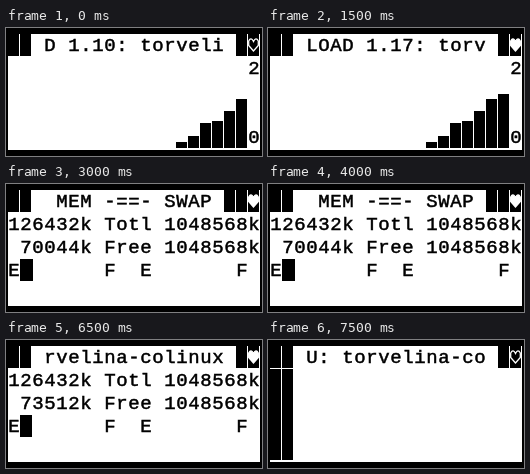
Animation, 256 px wide and 128 px high, one loop 8000 ms. Source, as an HTML page with a canvas:

```html
<!DOCTYPE html>
<html lang="en">
<head>
<meta charset="utf-8">
<title>Status display</title>
<style>
  html, body { margin: 0; width: 100%; height: 100%; overflow: hidden; background: #000; }
  canvas { display: block; width: 256px; height: 128px; }
</style>
</head>
<body>
<canvas id="lcd" width="256" height="128"></canvas>
<script>
const ctx = document.getElementById('lcd').getContext('2d');
const LEFT = 2, TOP = 6, CELL_W = 12, CELL_H = 23;
const TICK = 500, LOOP = 8000, TITLE_W = 15;
const HOST = 'torvelina-colinux';
const BEATS = [1, 3, 6, 8, 11, 13];
const LOADS = [0.13, 0.26, 0.54, 0.59, 0.80, 1.07];

const colX = col => LEFT + col * CELL_W;

function box(x, y, w, h, color = '#000') {
  ctx.fillStyle = color;
  ctx.fillRect(x, y, w, h);
}

// Each character is centred in its own cell.
function print(text, col, row) {
  ctx.fillStyle = ctx.strokeStyle = '#000';
  ctx.lineWidth = 0.5;
  [...text].forEach((ch, i) => {
    const x = colX(col + i) + CELL_W / 2, y = 23 + row * CELL_H;
    ctx.fillText(ch, x, y);
    ctx.strokeText(ch, x, y);
  });
}

const block = col => box(colX(col), TOP, CELL_W - 1, CELL_H - 1);

function heart(filled) {
  ctx.beginPath();
  ctx.moveTo(247.5, 23);
  ctx.lineTo(242.7, 17.5);
  ctx.lineTo(242.7, 13);
  ctx.quadraticCurveTo(245, 8.5, 247.5, 13.5);
  ctx.quadraticCurveTo(250, 8.5, 252.3, 13);
  ctx.lineTo(252.3, 17.5);
  ctx.closePath();
  ctx.strokeStyle = ctx.fillStyle = '#fff';
  ctx.lineWidth = 1.3;
  ctx.stroke();
  if (filled) ctx.fill();
}

function header(title, offset, filled) {
  const shown = title.slice(offset, offset + TITLE_W);
  [0, 1, 20].forEach(block);
  for (let c = 4 + shown.length; c < 20; c++) block(c);
  print(shown, 3, 0);
  heart(filled);
}

function vbar(col, height, bottom) {
  box(colX(col), bottom - height, CELL_W - 1, height);
}

function loadScreen(tick, filled) {
  const loads = tick < 3 ? LOADS : [...LOADS, 1.17];
  const now = tick < 3 ? '1.10' : '1.17';
  header(`LOAD ${now}: ${HOST}`, 3 - tick, filled);
  loads.forEach((v, i) => vbar(20 - loads.length + i, Math.round(v * 46), 120));
  print('2', 20, 1);
  print('0', 20, 4);
}

function memScreen(tick, filled) {
  const [free, used] = tick < 5 ? [89108, 8]
    : tick < 10 ? [70044, 13]
    : tick < 13 ? [55752, 17] : [73512, 12];
  if (tick < 10) header(' MEM -==- SWAP', 0, filled);
  else header(HOST, 2, filled);
  print('126432k Totl 1048568k', 0, 1);
  print(` ${free}k Free 1048568k`, 0, 2);
  print('E       F  E       F', 0, 3);
  box(colX(1), TOP + 3 * CELL_H, used, CELL_H - 1);
}

function cpuScreen(tick, filled) {
  header(`CPU: ${HOST}`, 17 - tick, filled);
  [0, 1].forEach(c => vbar(c, 91, 120));
}

function draw(ms) {
  const tick = Math.floor((ms % LOOP) / TICK);
  const filled = BEATS.includes(tick);
  box(0, 0, 256, 128);
  box(LEFT, TOP, 252, 116, '#fff');
  ctx.font = '19px "Liberation Mono", monospace';
  ctx.textAlign = 'center';
  if (tick < 4) loadScreen(tick, filled);
  else if (tick < 14) memScreen(tick, filled);
  else cpuScreen(tick, filled);
}

const start = performance.now();
function frame() {
  draw(performance.now() - start);
  requestAnimationFrame(frame);
}
frame();
</script>
</body>
</html>
```
